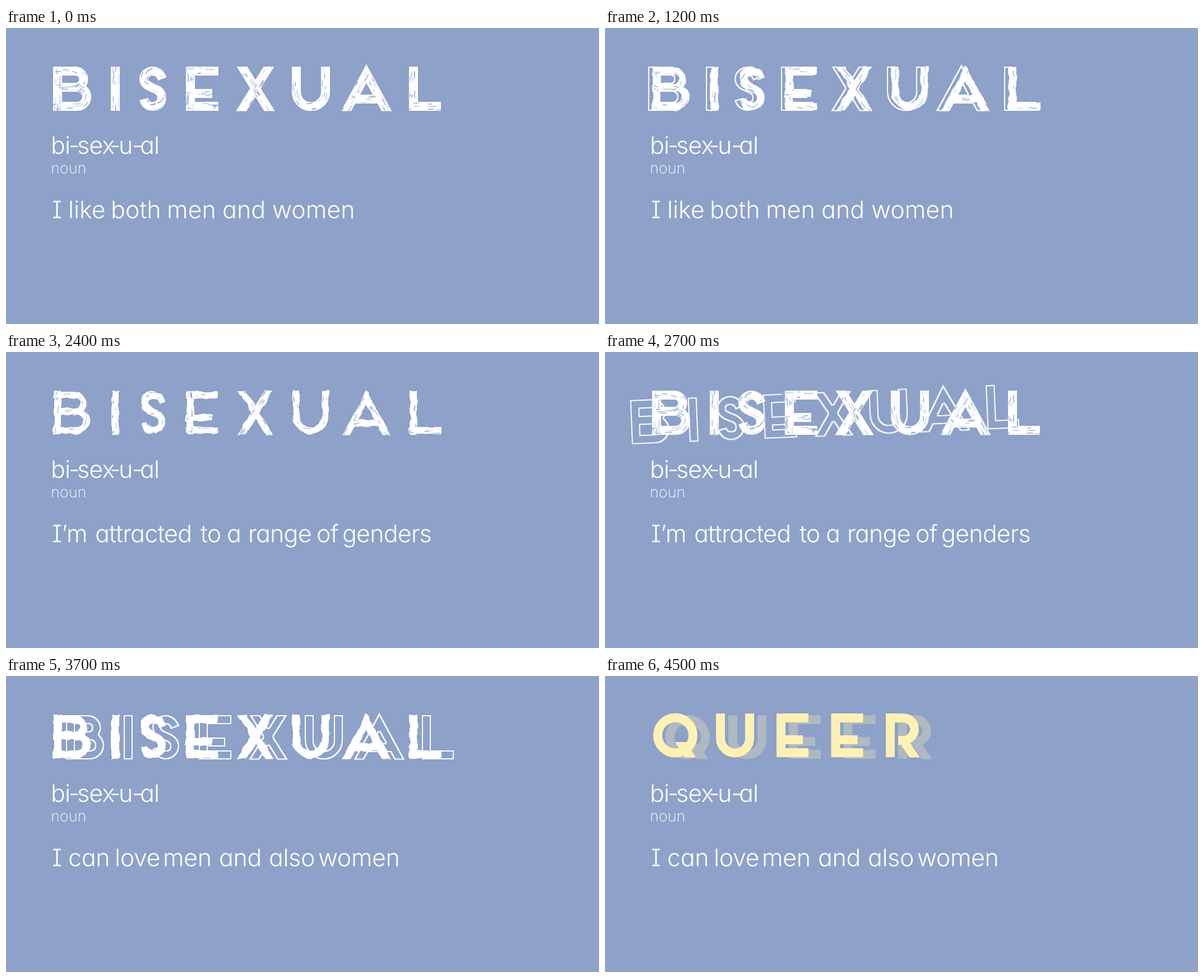
These frames come from a looping animation (1058x529 px, 4.7 s). An HTML page:

```html
<!DOCTYPE html>
<html lang="en">
<head>
<meta charset="utf-8">
<title>Definition</title>
<style>
  html, body { margin: 0; width: 100%; height: 100%; overflow: hidden; background: #8da1c9; }
  svg { display: block; width: 100%; height: 100%; }
  text {
    font: 360 43px Inter, "Open Sans", sans-serif;
    font-feature-settings: "cv08", "cv11";
    font-optical-sizing: none;
    text-rendering: geometricPrecision;
    fill: #fff;
  }
  #kind { font-size: 27px; font-weight: 240; }
  .ink { fill: none; stroke: #fff; }
  .scratch { fill: none; stroke: #8da1c9; }
</style>
</head>
<body>
<svg id="stage" viewBox="0 0 1058 529">
  <defs>
    <clipPath id="lines"><path d="M0 69H590V0H700V69H1058V148.5H0Z"/></clipPath>
    <filter id="outline" filterUnits="userSpaceOnUse" x="0" y="0" width="1058" height="529">
      <feMorphology operator="erode" radius="2" result="core"/>
      <feComposite in="SourceGraphic" in2="core" operator="out"/>
    </filter>
    <filter id="rough" filterUnits="userSpaceOnUse" x="0" y="0" width="1058" height="529" color-interpolation-filters="sRGB">
      <feTurbulence type="fractalNoise" baseFrequency=".06" numOctaves="2" seed="4"/>
      <feDisplacementMap in="SourceGraphic" scale="6" xChannelSelector="R" yChannelSelector="G"/>
    </filter>
  </defs>
</svg>
<script>
const LOOP = 4700;
const stage = document.getElementById('stage');

// Centre lines of the headline letters.
const bisexual = [
  'M92 69V148', 'M84 77H124a14.5 14.5 0 0 1 0 29H92', 'M92 106H127a17 17 0 0 1 0 34H84',
  'M195 69V148',
  'M279 91C275 81 269 77 262 77C252 77 246 84 246 91C246 99 252 103 262 107C273 111 278 117 278 124C278 134 271 140 262 140C253 140 248 135 246 127',
  'M329 69V148', 'M321 77H379', 'M321 117H368', 'M321 140H379',
  'M413.8 158L475.2 59', 'M414.8 59L476.2 158',
  'M518 69V114.5a26 26 0 0 0 52 0V69',
  'M601.6 158L643 81.6L684.4 158', 'M620 127H666',
  'M727 69V148', 'M719 140H776'
];

const letterE = 'v78m-8 -70h57m-57 39h47m-47 23h57';
const queer = `
  <g id="queerShape">
    <path fill="none" stroke="#fff1b3" stroke-width="16" d="M94 106a31.5 31.5 0 1 0 63 0a31.5 31.5 0 1 0 -63 0
      M206 67V111.5a26 26 0 0 0 52 0V67 M314 67${letterE} M411.5 67${letterE}
      M509 67V145 M501 75H532a20 20 0 0 1 0 40H523"/>
    <path fill="#fff1b3" d="M125 118H145L162 145.5H142Z M523 115H541L562 145.5H543Z"/>
  </g>`;

function random(seed) {
  return () => (seed = seed * 16807 % 2147483647) / 2147483647;
}

function word(width) {
  return `<path class="ink" stroke-width="${width}" d="${bisexual.join('')}"/>`;
}

// Broken hairlines that follow each letter stroke.
function scratches(count, spread, seed) {
  const rnd = random(seed * 7919);
  const jitter = () => (rnd() - .5) * spread;
  return bisexual.map(d => Array.from({ length: count }, () =>
    `<path class="scratch" d="${d}" transform="translate(${jitter()} ${jitter()})"
      stroke-width="${.5 + rnd()}" stroke-dasharray="${3 + rnd() * 14} ${18 + rnd() * 50}"
      stroke-dashoffset="${rnd() * 80}"/>`).join('')).join('');
}

function brushed(count, seed) {
  return `<g clip-path="url(#lines)">${word(16)}${scratches(count, 13, seed)}</g>`;
}

function scribbled(width, count, seed) {
  return `<g filter="url(#rough)"><g clip-path="url(#lines)">${word(width)}${scratches(count, 9, seed)}</g></g>`;
}

// Words are [x, text] pairs on one baseline.
function line(y, words, spacing) {
  const spans = words.map(([x, text]) => `<tspan x="${x - 2}">${text}</tspan>`).join('');
  return `<text y="${y}" letter-spacing="${spacing}">${spans}</text>`;
}

const layers = {
  brush: brushed(6, 1),
  brushB: brushed(6, 2),
  brushC: brushed(5, 3),
  thin: scribbled(12, 3, 4),
  medium: scribbled(13.5, 2, 5),
  solid: scribbled(14, 0, 6),
  strays: '<path class="ink" stroke-opacity=".6" d="M84 136.5H181M243 126H303"/><path fill="#fff" d="M297 109L302 105L300 109Z"/>',
  queer,
  like: line(340, [[84, 'I'], [113, 'like'], [189, 'both'], [289, 'men'], [388, 'and'], [477, 'women']], 0),
  range: line(340, [[84, 'I’m'], [161, 'attracted'], [349, 'to'], [396, 'a'], [434, 'range'], [556, 'of'], [602, 'genders']], -.8),
  love: line(340, [[84, 'I'], [113, 'can'], [196, 'love'], [282, 'men'], [382, 'and'], [471, 'also'], [559, 'women']], -.4)
};

stage.insertAdjacentHTML('beforeend', `
  <g id="echo"><g filter="url(#outline)"><g clip-path="url(#lines)">${word(16)}</g></g></g>
  <use id="shade" href="#queerShape" opacity=".3"/>
  ${Object.entries(layers).map(([id, art]) => `<g id="${id}">${art}</g>`).join('')}
  ${line(225, [[82, 'bi'], [114, '-'], [129, 'sex'], [187, '-'], [203, 'u'], [227, '-'], [241, 'al']], -1)}
  <text id="kind" x="80" y="260">noun</text>`);

const shift = (x, y = 0) => `translate(${x} ${y})`;

// [start in ms, visible layers, outline transform, shade transform]
const poses = [
  [0, 'brush'],
  [200, 'brushB'],
  [400, 'brush'],
  [600, 'brushC'],
  [800, 'brush', shift(-7)],
  [1000, 'brush', shift(-29)],
  [1200, 'medium', shift(-7)],
  [1400, 'brush strays'],
  [1800, 'brush'],
  [2000, 'brush strays'],
  [2200, 'brush', shift(28)],
  [2400, 'thin'],
  [2500, 'medium'],
  [2700, 'brush', shift(-38, 2.5) + 'rotate(-2.4 430 107)'],
  [2900, 'medium', shift(-7)],
  [3100, 'brush'],
  [3200, 'medium', shift(-7)],
  [3300, 'brush'],
  [3500, 'solid'],
  [3700, 'solid', shift(23, 1)],
  [3900, ''],
  [4100, 'queer'],
  [4300, 'queer', null, shift(-17, -3)],
  [4500, 'queer', null, shift(22, 3)]
];
const phrases = [[0, 'like'], [1600, 'range'], [3700, 'love']];

const at = (track, t) => track.findLast(([start]) => start <= t);

function show(id, visible) {
  document.getElementById(id).style.visibility = visible ? 'visible' : 'hidden';
}

function place(id, transform) {
  show(id, transform);
  if (transform) document.getElementById(id).setAttribute('transform', transform);
}

function frame() {
  const t = performance.now() % LOOP;
  const [, names, echo, shade] = at(poses, t);
  const visible = [...names.split(' '), at(phrases, t)[1]];
  for (const id in layers) show(id, visible.includes(id));
  place('echo', echo);
  place('shade', shade);
  requestAnimationFrame(frame);
}
frame();
</script>
</body>
</html>
```
